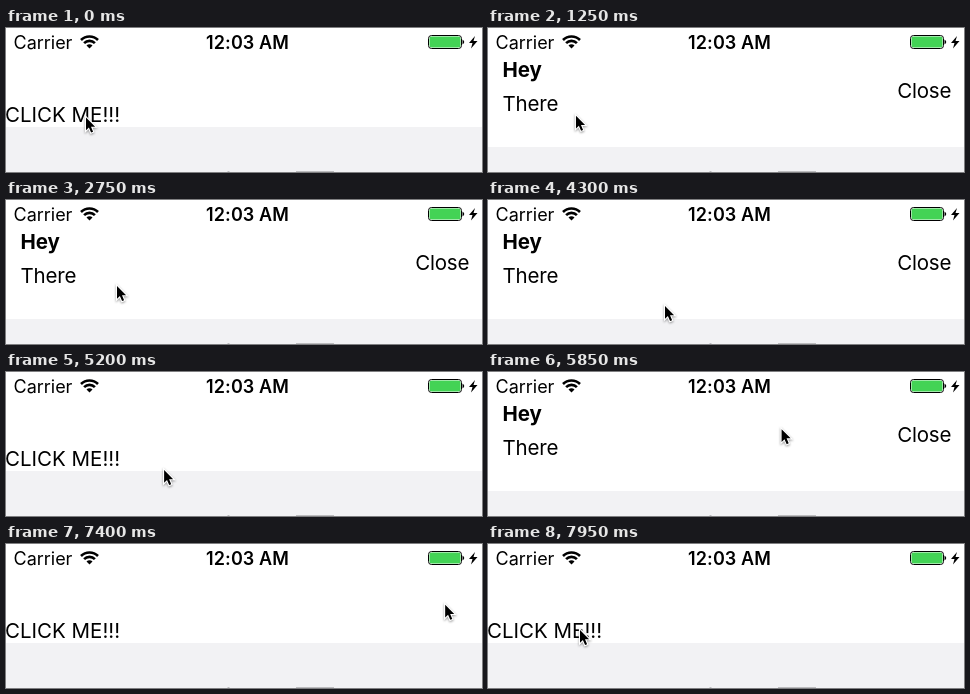
An HTML page for the animation above (8 s loop, 476 px wide and 144 px high).

```html
<!DOCTYPE html>
<html lang="en">
<head>
<meta charset="utf-8">
<title>Drop-down banner</title>
<style>
  html, body { margin: 0; width: 100%; height: 100%; overflow: hidden; background: #f2f2f4; }
  svg { display: block; }
  text { font: 20.5px Inter, sans-serif; }
  #banner text { letter-spacing: -.2px; }
  #banner .bold { font-weight: 700; letter-spacing: -.1px; }
  .status text { font-size: 18px; }
  .status .time { font-weight: 600; letter-spacing: .1px; }
  #cursor { filter: drop-shadow(0 1px 1px #0006); }
</style>
</head>
<body>
<svg width="476" height="144" viewBox="0 0 476 144">
  <rect width="476" height="144" fill="#f2f2f4"/>
  <rect width="476" height="99" fill="#fff"/>
  <path d="M290 143.5H328M221.5 143.5h2" stroke="#bcbcbe"/>
  <text x="-1" y="94">CLICK ME!!!</text>

  <g id="banner">
    <rect width="476" height="119" fill="#fff"/>
    <text class="bold" x="14.5" y="49">Hey</text>
    <text x="14.5" y="82.5">There</text>
    <text x="409.2" y="69.5">Close</text>
  </g>

  <g class="status">
    <text x="7.5" y="21">Carrier</text>
    <g transform="translate(83.5 20.5)" fill="none" stroke="#000" stroke-width="2.6">
      <path d="M-8.5-8.5A12 12 0 0 1 8.5-8.5M-5.4-5.4A7.6 7.6 0 0 1 5.4-5.4"/>
      <path d="M0 0L-3-3A4.2 4.2 0 0 1 3-3Z" fill="#000" stroke="none"/>
    </g>
    <text class="time" x="241.5" y="21" text-anchor="middle">12:03 AM</text>
    <rect x="422.5" y="7.5" width="33" height="13" rx="3" fill="#fff" stroke="#000"/>
    <rect x="423.5" y="8.5" width="31" height="11" rx="2" fill="#43d355"/>
    <path d="M456.500 11.500Q460 14 456.500 16.500Z"/>
    <path d="M469 8L463 15H466.500L465 20.500L471.500 13H467.500Z"/>
  </g>

  <path id="cursor" d="M.5 1V13.8L3.4 11L5.6 16L7.6 15.2L5.5 10.2H9.6Z"
        stroke="#fff" stroke-width="2.2" paint-order="stroke"/>
</svg>
<script>
const LOOP = 8000, TICK = 50, HEIGHT = 119, SLIDE = 180;
const banner = document.getElementById('banner');
const cursor = document.getElementById('cursor');

// Each click opens or closes the banner in turn.
const clicks = [430, 4530, 5530, 6910];

// Where the pointer comes to rest: arrival time, x, y
const stops = [
  [0, 79.5, 88.5],
  [1770, 419, 65],
  [2750, 110.5, 85],
  [3700, 149, 86],
  [4300, 176.5, 105],
  [4750, 190, 108],
  [5450, 80, 83.5],
  [6080, 413, 60],
  [6750, 441.5, 60],
  [7950, 91.5, 85]
];

const clamp = u => Math.min(1, Math.max(0, u));
const smooth = u => u * u * (3 - 2 * u);

function bannerY(t) {
  const shown = clicks.reduce((sum, start, i) =>
    sum + (i % 2 ? -1 : 1) * clamp((t - start) / SLIDE), 0);
  return (shown - 1) * HEIGHT;
}

// Longer reaches take more time and rise in a wider arc.
function cursorAt(t) {
  const next = stops.findIndex(stop => stop[0] > t);
  if (next < 0) return stops.at(-1).slice(1);
  const [, x, y] = stops[next - 1], [arrival, toX, toY] = stops[next];
  const distance = Math.hypot(toX - x, toY - y);
  const p = smooth(clamp(1 - (arrival - t) / (300 + 0.8 * distance)));
  const arc = 0.16 * distance * p * (1 - p);
  return [x + (toX - x) * p, y + (toY - y) * p - arc];
}

const place = (el, x, y) => el.setAttribute('transform', `translate(${x} ${y})`);

function draw() {
  const t = Math.floor(performance.now() % LOOP / TICK) * TICK;
  place(banner, 0, bannerY(t));
  place(cursor, ...cursorAt(t));
  requestAnimationFrame(draw);
}
draw();
</script>
</body>
</html>
```
